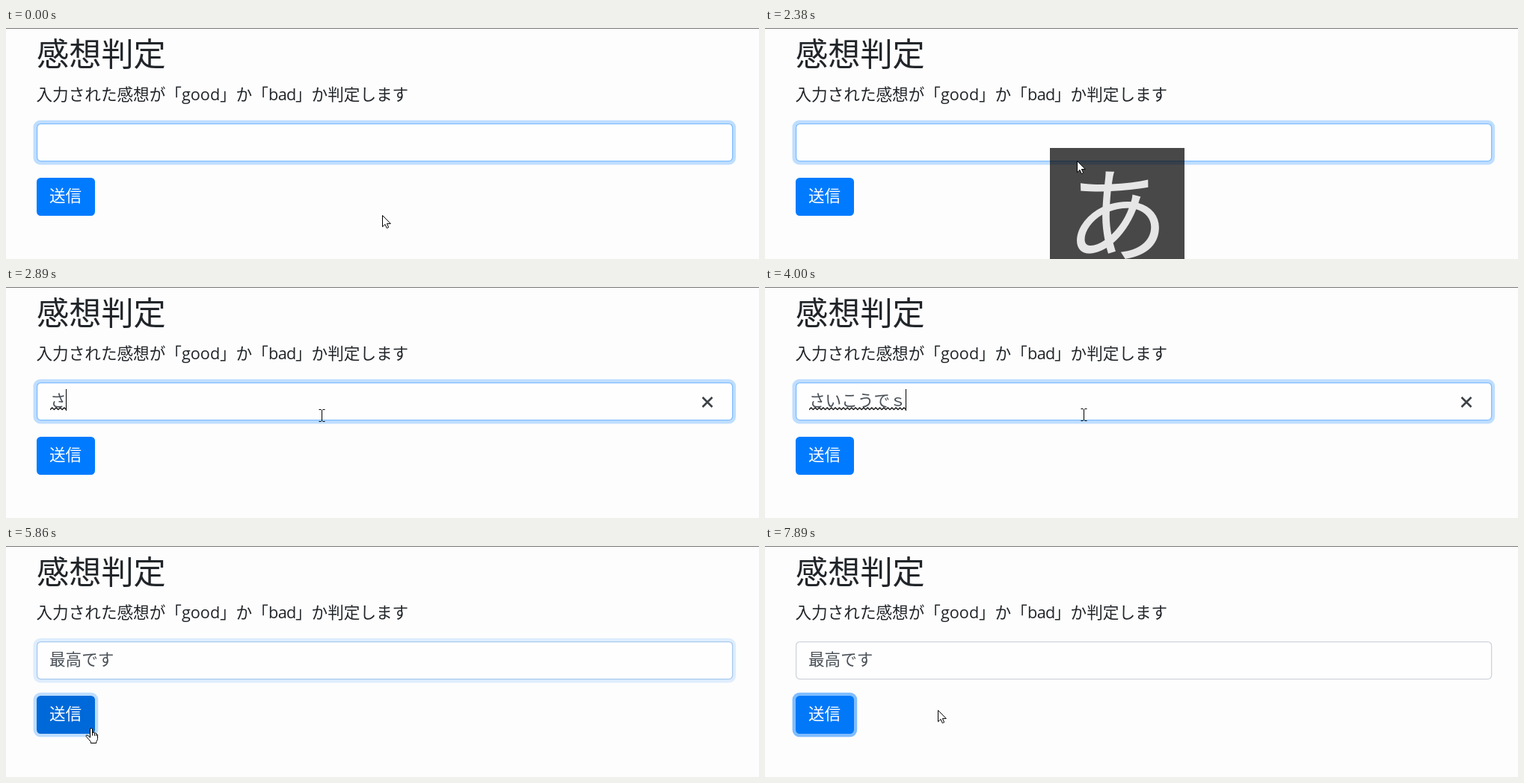
Recreate the animation shown at these times as an HTML page. Size 1007 by 310 pixels, loop 8000 ms.

```html
<!DOCTYPE html>
<html lang="ja">
<head>
<meta charset="utf-8">
<title>感想判定</title>
<style>
  html, body { margin: 0; width: 100%; height: 100%; overflow: hidden; background: #fdfdfd; }
  svg { display: block; }
  text { font: 350 21.6px "Noto Sans CJK JP", "Noto Sans CJK", sans-serif; fill: #212529; white-space: pre; }
  .latin { font-family: "Open Sans", "Noto Sans", sans-serif; font-weight: 400; }
  .title { font-size: 43.2px; }
  #value { fill: #495057; }
  #ime text { font-size: 138px; font-weight: 400; fill: #e6e6e6; text-anchor: middle; }
  #pointer path { stroke: #000; stroke-linejoin: round; }
</style>
</head>
<body>
<svg width="1007" height="310" viewBox="0 0 1007 310">
  <defs>
    <pattern id="wave" x="59" y="161" width="5.4" height="5" patternUnits="userSpaceOnUse">
      <path d="M-1 4.6 0 3.6 2.7 1 5.4 3.6 6.4 4.6" fill="none" stroke="#000" stroke-width="1.3"/>
    </pattern>
  </defs>

  <rect width="1007" height="310" fill="#fdfdfd"/>
  <rect width="1007" height="1" fill="#777"/>

  <text class="title" x="41" y="51">感想判定</text>
  <text x="40.5" y="97">入力された感想が「</text>
  <text class="latin" x="235" y="97">good</text>
  <text x="286" y="97">」か「</text>
  <text class="latin" x="351" y="97" letter-spacing="-.6">bad</text>
  <text x="387" y="97">」か判定します</text>

  <rect id="fieldRing" x="36.5" y="123.7" width="939.6" height="59.9" rx="9.5" fill="#bfdeff"/>
  <rect id="field" x="41.6" y="128.6" width="930" height="50" rx="5" fill="#fefefe" stroke-width="1.3"/>
  <text id="value" x="58" y="160"></text>
  <rect id="under" x="59" height="5" y="161"/>
  <rect id="caret" width="1" height="29"/>
  <path id="clear" d="M931.5 148 944.5 161M944.5 148 931.5 161" stroke="#3c4146" stroke-width="2.5"/>

  <rect id="btnRing" x="36.6" y="196.7" width="86.6" height="59.6" rx="9.5" fill="#7fbdff"/>
  <rect id="btn" x="41" y="201" width="78" height="51" rx="5.4"/>
  <text x="58" y="233" style="fill:#fff">送信</text>

  <g id="ime">
    <rect x="381" y="161" width="180" height="149" fill="#000" opacity=".715"/>
    <text x="471" y="302">あ</text>
  </g>

  <g id="pointer">
    <path id="arrow" d="M.5.5V15.8L4 12.5 6.3 17.6 8.7 16.5 6.4 11.6H11.3Z" fill="#fff"/>
    <path id="beam" d="M-4-7.5H-1M1-7.5H4M0-7V8M-4 8.5H-1M1 8.5H4" fill="none" transform="translate(.5 0)"/>
    <path id="hand" d="M6.5 13V2Q6.5.5 8 .5T9.5 2V7Q9.7 6 11 6T12.4 7.5Q12.6 6.7 13.6 6.9T14.8 8.5Q15 8 15.7 8.4T16.5 10V14.5Q16.3 17 14.8 18.5V20.5H7.3V18.5Q4.5 15.5 1.2 11.5 .6 10 2.2 9.9 4 10.3 6.5 13M9.5 7V10.5M12.4 7.5V10.8M14.8 8.5V11" fill="#fff"/>
  </g>
</svg>
<script>
const LOOP = 8000, EM = 21.6;
const $ = id => document.getElementById(id);

// Each row: start time, then the values held until the next row.
const pointer = [
  [0, 'arrow', 503, 251], [630, 'arrow', 494, 241], [750, 'arrow', 462, 217],
  [870, 'arrow', 420, 192], [1000, 'beam', 385, 170], [1120, 'beam', 366, 155],
  [2380, 'arrow', 417, 178], [2890, 'beam', 422, 172], [3740, 'beam', 426, 171],
  [4120, 'beam', 428, 171], [5120, 'arrow', 335, 192], [5240, 'arrow', 233, 226],
  [5360, 'arrow', 168, 238], [5480, 'arrow', 131, 238], [5600, 'hand', 106, 236],
  [5740, 'hand', 106, 241], [5860, 'hand', 106, 244], [7100, 'hand', 107, 244],
  [7470, 'hand', 104, 244], [7590, 'hand', 101, 244], [7740, 'hand', 101, 236],
  [7890, 'arrow', 231, 220]
];
const typed = [
  [0, '', ''], [2890, 'さ', 'wave'], [3010, 'さい', 'wave'], [3130, 'さいｋ', 'wave'],
  [3250, 'さいこ', 'wave'], [3370, 'さいこう', 'wave'], [3490, 'さいこうｄ', 'wave'],
  [3740, 'さいこうで', 'wave'], [4000, 'さいこうでｓ', 'wave'], [4120, 'さいこうです', 'wave'],
  [4250, '最高です', 'line'], [4610, '最高です', '']
];
const blink = [
  [0, 0], [1490, 1], [2010, .5], [2130, 0], [2500, .5], [2620, 1],
  [4750, .5], [4870, 0], [5240, .4], [5360, 1], [5860, 0]
];
const focus = [[0, 1], [5860, .5], [5980, 0]];
const button = [[0, '#007bff'], [5740, '#0069d9'], [5980, '#0062cc'], [6100, '#0069d9'], [7890, '#0078f8']];

const at = (rows, t) => rows.findLast(r => r[0] <= t).slice(1);
const set = (id, attrs) => { for (const k in attrs) $(id).setAttribute(k, attrs[k]); };
const show = (id, on) => { $(id).style.display = on ? '' : 'none'; };
const mix = (a, b, k) => `rgb(${a.map((v, i) => Math.round(v + (b[i] - v) * k))})`;

function draw(t) {
  const [shape, x, y] = at(pointer, t);
  set('pointer', { transform: `translate(${x} ${y})` });
  for (const s of ['arrow', 'beam', 'hand']) show(s, s === shape);

  const [text, mark] = at(typed, t);
  const shift = mark ? 1 : 0;
  $('value').textContent = text;
  set('value', { x: 58 + shift });
  show('under', mark);
  set('under', {
    width: text.length * EM,
    y: mark === 'line' ? 163 : 161,
    height: mark === 'line' ? 2 : 5,
    fill: mark === 'line' ? '#000' : 'url(#wave)'
  });
  set('caret', {
    x: Math.floor(58 + shift + text.length * EM),
    y: text ? 137 : 139,
    opacity: at(blink, t)[0]
  });

  const [f] = at(focus, t);
  set('fieldRing', { opacity: f });
  set('field', { stroke: mix([206, 212, 218], [128, 189, 255], f) });
  show('clear', text && f === 1);
  set('btnRing', { opacity: 1 - f });
  set('btn', { fill: at(button, t)[0] });
  show('ime', t >= 2380 && t < 2890);
}

const start = performance.now();
function tick() {
  draw((performance.now() - start) % LOOP);
  requestAnimationFrame(tick);
}
draw(0);
requestAnimationFrame(tick);
</script>
</body>
</html>
```
